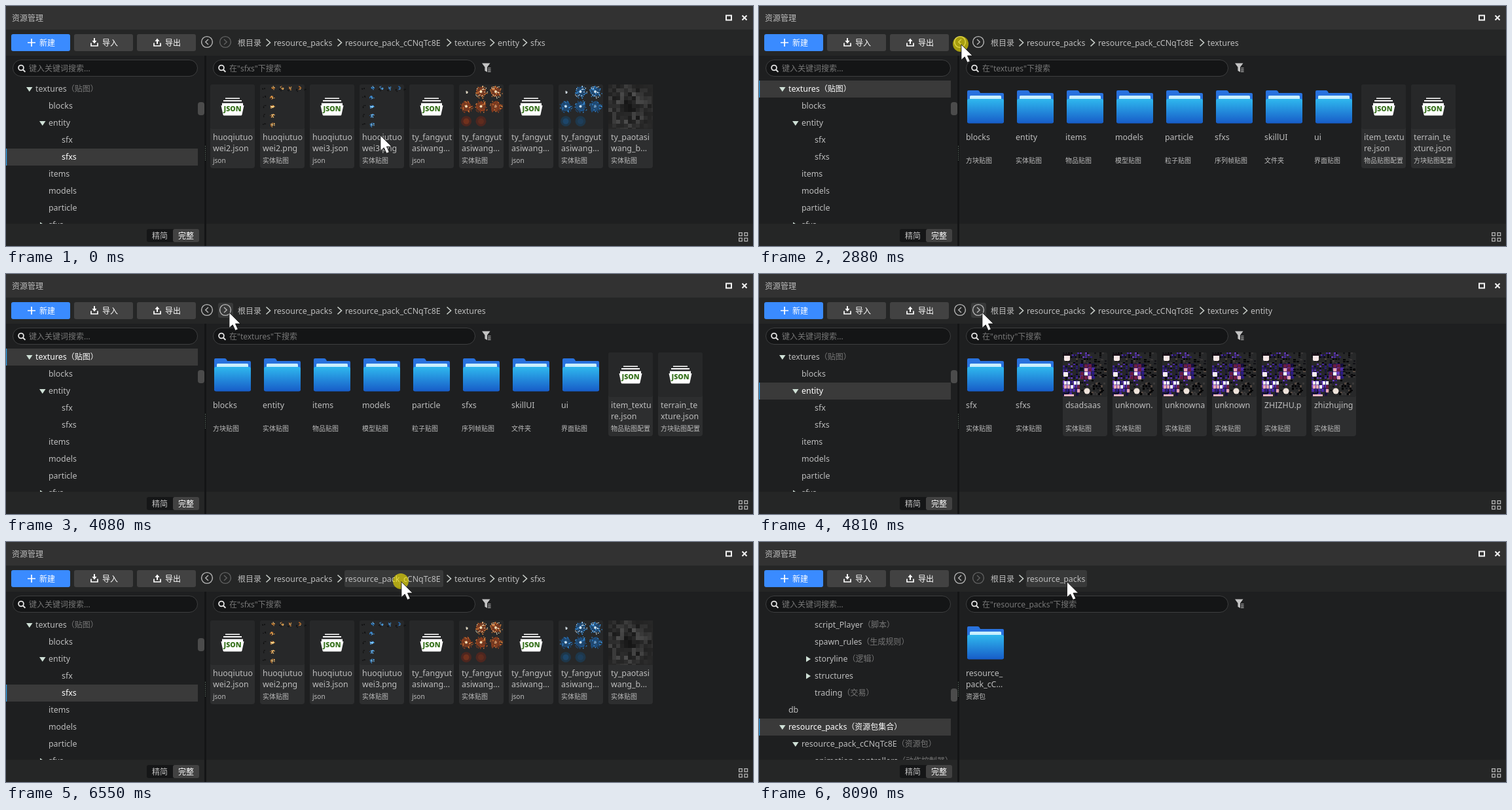
Write an HTML page that moves like this. It is 1141 px wide and 367 px high and loops after 8620 ms.

```html
<!DOCTYPE html>
<html lang="zh-CN">
<head>
<meta charset="utf-8">
<title>资源管理</title>
<style>
html, body { margin: 0; width: 100%; height: 100%; overflow: hidden; background: #1e1f20; }
svg { display: block; width: 1141px; height: 367px; }
text { font-family: "Noto Sans", "Noto Sans CJK SC", "Noto Sans CJK", sans-serif; font-size: 12.4px; fill: #bdbdbd; white-space: pre; }
.cn { font-size: 12px; }
.kind { font-size: 10px; }
.dim { fill: #777; }
.on { fill: #fff; }
.json { font-family: "Open Sans", "Noto Sans", sans-serif; font-size: 10.6px; font-weight: 800; fill: #3a7420; text-anchor: middle; }
</style>
</head>
<body>
<svg id="stage" viewBox="0 0 1141 367" xmlns="http://www.w3.org/2000/svg"></svg>
<script>
const LOOP = 8620, STEP = 70;
const stage = document.getElementById('stage');

// drawing helpers
const box = (x, y, w, h, fill, r = 0, more = '') =>
  `<rect x="${x}" y="${y}" width="${w}" height="${h}" rx="${r}" fill="${fill}" ${more}/>`;
const label = (x, y, s, cls = '') => `<text x="${x}" y="${y}" class="${cls}">${s}</text>`;
const line = (d, color, w = 1.5) => `<path d="${d}" fill="none" stroke="${color}" stroke-width="${w}"/>`;
const fill = (d, color) => `<path d="${d}" fill="${color}"/>`;
const disc = (x, y, r, color, o = 1) => `<circle cx="${x}" cy="${y}" r="${r}" fill="${color}" opacity="${o}"/>`;
const at = (x, y, s) => `<g transform="translate(${x} ${y})">${s}</g>`;

function seeded(seed) {
  return () => (seed = (seed * 16807) % 2147483647) / 2147483647;
}

// thumbnails, each 68 x 68
function specks(rnd, cx, cy, r, n, colors, size = 1.3) {
  let s = '';
  for (let i = 0; i < n; i++) {
    const a = rnd() * Math.PI * 2, d = r * Math.sqrt(rnd());
    s += box((cx + d * Math.cos(a)).toFixed(1), (cy + d * Math.sin(a)).toFixed(1), size, size,
      colors[Math.floor(rnd() * colors.length)]);
  }
  return s;
}

function trail(colors) {
  const rnd = seeded(77);
  let s = '';
  for (let i = 0; i < 4; i++) {
    s += specks(rnd, 19 + 13.5 * i, 5, 3.2 - i * 0.2, 10 - i, colors);
    s += specks(rnd, 30 + 13 * i, 8, 2, 3, ['#0b0b0c', '#141414']);
    s += specks(rnd, 18.5, 20 + 13.7 * i, 3.4, 15, colors);
    s += specks(rnd, 6, 19 + 13.7 * i, 2.4, 4, ['#0b0b0c', '#141414']);
  }
  return s + specks(rnd, 5, 6, 2, 4, ['#0b0b0c']) + box(17, 33, 4, 2, colors[1]);
}

function blast([hot, mid, low, faint]) {
  const rnd = seeded(431);
  let s = specks(rnd, 11, 11, 1.6, 7, ['#fff', hot]);
  for (let i = 1; i < 8; i++) {
    const x = 11 + 22.5 * (i % 3), y = 11 + 22.6 * Math.floor(i / 3), late = i > 5;
    s += disc(x, y, late ? 8 : 7.5, late ? faint : low, late ? 0.55 : 0.6);
    if (late) s += disc(x, y, 4.5, low, i === 6 ? 0.4 : 0.2);
    else s += specks(rnd, x, y, 10, 44, i < 3 ? [hot, mid, mid] : [mid, low, low]) + disc(x, y, 2, hot, i < 5 ? 0.9 : 0.4);
  }
  return s;
}

function smoke() {
  const rnd = seeded(90);
  let s = '';
  for (let y = 0; y < 68; y += 6)
    for (let x = 0; x < 68; x += 6) {
      const d = Math.hypot(x - 28, y - 32) / 36;
      const ringed = Math.max(0, 1 - Math.abs(d - 0.6) * 1.6);
      const v = Math.round(Math.max(16, 39 + (rnd() - 0.3) * 62 * ringed - (d < 0.3 ? 20 : 0)));
      s += box(x, y, Math.min(6, 68 - x), Math.min(6, 68 - y), `rgb(${v},${v},${v})`);
    }
  return s;
}

function skin() {
  const rnd = seeded(2024);
  const violet = ['#2b1a80', '#4a2aa8', '#16103c', '#0b0a18', '#6a3cc0'];
  const pale = ['#fff', '#f6e6ee', '#fff', '#e8a8b4', '#6a1c40'];
  const dark = ['#050507', '#111116', '#000', '#3a3838', '#544840'];
  // x, y, width, height, tile width, tile height, palette, density
  const zones = [
    [0, 0, 68, 68, 4, 3, dark, 0.35], [14, 0, 34, 11, 4, 3, violet, 0.5],
    [0, 17, 27, 26, 4, 3, violet, 0.75], [0, 43, 28, 24, 5, 6, violet, 0.9],
    [2, 44, 26, 23, 5, 6, pale, 0.5], [26, 17, 24, 26, 6, 6, violet, 1],
    [27, 18, 23, 25, 6, 6, pale, 0.85], [48, 10, 20, 28, 5, 3, dark, 0.5],
    [28, 42, 14, 10, 4, 3, violet, 0.7], [42, 46, 26, 20, 4, 4, dark, 0.5]
  ];
  let s = '';
  for (const [x0, y0, w, h, tw, th, colors, density] of zones)
    for (let y = y0; y <= y0 + h - th; y += th)
      for (let x = x0; x <= x0 + w - tw; x += tw)
        if (rnd() < density) s += box(x, y, tw - 1, th - 0.8, colors[Math.floor(rnd() * colors.length)]);
  return s + box(2, 3, 9, 10, '#f5e6e6', 2) + box(1, 2, 11, 3, '#1a1018') + box(1, 30, 7, 7, '#f7edf2', 1)
    + disc(37, 59, 4.5, '#f0e4dc') + box(2, 64, 15, 3, '#f3b8c4');
}

const folder = fill('M6 58V11q0-2 2-2H22q2 0 3 2l1 2H60q2 0 2 2V58z', '#2872de')
  + box(10, 17, 48, 8, '#c9efff', 1.5) + box(6, 22, 56, 37.5, 'url(#blue)', 3);
const json = box(23, 20.5, 22, 1.6, '#fff') + box(20, 24, 28, 2, '#fff')
  + fill('M18 28.5H50V32h1.5L48.5 46q-.3 1.5-1.7 1.5H21.2q-1.4 0-1.7-1.5L16.5 32H18z', '#fff')
  + `<text x="34" y="40.7" class="json">JSON</text>`;

const art = {
  d: folder, j: json, s: skin(), m: smoke(),
  o: trail(['#f0a040', '#ffd488', '#c86a20']), b: trail(['#3a9df0', '#7cc8ff', '#1f66b8']),
  e: blast(['#fff0c8', '#ee8a3c', '#a8441c', '#6e2418']),
  c: blast(['#dff2ff', '#3a9cf0', '#1c5c9c', '#174466']),
  r: box(0, 0, 68, 68, '#fff') + disc(35, 33, 26, '#2463bd')
};

// card text: art code, type, first line, second line
function card(spec, i) {
  const [code, kind = '', a = '', b = ''] = spec.split('|');
  const back = code === 'd' ? '' : box(0, 0, 68, 128, '#2d2e2f', 4) + box(0, 0, 68, 68, '#272829', 3);
  return at(312 + 76 * (i % 10), 120 + 132 * Math.floor(i / 10),
    back + `<use href="#art-${code}"/>` + label(4, 85, a) + label(4, 102, b) + label(4, 120, kind, 'kind'));
}

// tree rows: arrow, indent level, name, note
const trees = {
  upper: { thumb: 147, rows: ['v|1|textures|贴图', ' |2|blocks', 'v|2|entity', ' |3|sfx', ' |3|sfxs', ' |2|items', ' |2|models', ' |2|particle', '>|2|sfxs'] },
  lower: { thumb: 224, rows: [' |3|script_Player|脚本', ' |3|spawn_rules|生成规则', '>|3|storyline|逻辑', '>|3|structures', ' |3|trading|交易', ' |1|db',
    'v|1|resource_packs|资源包集合', 'v|2|resource_pack_cCNqTc8E|资源包', ' |3|animation_controllers|动作控制器'] }
};

function tree({ thumb, rows }, chosen) {
  return rows.map((row, i) => {
    const [arrow, level, name, note] = row.split('|');
    const x = 25 + 20 * level, y = 127 + 26 * i, on = i === chosen;
    return (on ? box(0, y - 13, 293, 26, '#3a3a3a') + box(0, y - 13, 1.2, 26, '#2da0ea') : '')
      + (arrow === 'v' ? fill(`M${x - 14} ${y - 3}h9.5l-4.75 7z`, '#cfe0d6') : '')
      + (arrow === '>' ? fill(`M${x - 13} ${y - 4.5}v9l7-4.5z`, '#cfe0d6') : '')
      + label(x, y + 4, name + (note ? `<tspan class="cn ${on ? 'on' : 'dim'}">（${note}）</tspan>` : ''), on ? 'on' : '');
  }).join('') + box(293, thumb, 10, 20, '#4b4b4b', 4);
}

const crumbs = ['根目录', 'resource_packs', 'resource_pack_cCNqTc8E', 'textures', 'entity', 'sfxs'];
const crumbX = [354, 409, 518, 685, 751, 801];
const chevron = (x, y, c = '#c9cfca') => line(`M${x - 3} ${y - 5.5}l6 5.5-6 5.5`, c, 1.6);
const skins = ['dsadsaas', 'unknown.', 'unknowna', 'unknown', 'ZHIZHU.p', 'zhizhujing'];

const views = {
  sfxs: { depth: 6, tree: 'upper', row: 4, cards: [
    'j|json|huoqiutuo|wei2.json', 'o|实体贴图|huoqiutuo|wei2.png', 'j|json|huoqiutuo|wei3.json', 'b|实体贴图|huoqiutuo|wei3.png',
    'j|json|ty_fangyut|asiwang...', 'e|实体贴图|ty_fangyut|asiwang...', 'j|json|ty_fangyut|asiwang...', 'c|实体贴图|ty_fangyut|asiwang...',
    'm|实体贴图|ty_paotasi|wang_b...'] },
  entity: { depth: 5, tree: 'upper', row: 2, cards: [
    'd|实体贴图|sfx', 'd|实体贴图|sfxs', ...skins.map(n => 's|实体贴图|' + n)] },
  textures: { depth: 4, tree: 'upper', row: 0, cards: [
    'd|方块贴图|blocks', 'd|实体贴图|entity', 'd|物品贴图|items', 'd|模型贴图|models', 'd|粒子贴图|particle', 'd|序列帧贴图|sfxs',
    'd|文件夹|skillUI', 'd|界面贴图|ui', 'j|物品贴图配置|item_textu|re.json', 'j|方块贴图配置|terrain_te|xture.json'] },
  pack: { depth: 3, tree: 'lower', row: 7, scroll: true, cards: [
    'd|原版模型动作|animation', 'd|原版动作...|animation', 'd|装备挂件配置|attachabl', 'd|文件夹|camera', 'd|中国版特...|effects',
    'd|实体资源...|entity', 'd|字体|font', 'd|材质|materials', 'd|文件夹|models', 'd|中国版物...|netease_it',
    ...'ddddddjrj'] },
  packs: { depth: 2, tree: 'lower', row: 6, cards: ['d|资源包|resource_|pack_cC...'] }
};

function view(name) {
  const v = views[name];
  let s = tree(trees[v.tree], v.row);
  for (let i = 0; i < v.depth; i++)
    s += label(crumbX[i], 61, crumbs[i], i ? '' : 'cn') + (i ? chevron(crumbX[i] - 8.5, 56) : '');
  s += label(341, 100, `在"${crumbs[v.depth - 1]}"下搜索`, 'cn dim');
  s += `<g clip-path="url(#list)">${v.cards.map(card).join('')}</g>`;
  if (v.scroll) s += box(1130, 120, 10, 164, '#4b4b4b', 4);
  return `<g id="view-${name}">${s}</g>`;
}

const search = (x, w) => box(x + 0.5, 82.5, w - 1, 25, '#141516', 12.5, 'stroke="#3e3f40"')
  + `<circle cx="${x + 13}" cy="94.5" r="3.9" fill="none" stroke="#e4e4e4" stroke-width="1.8"/>`
  + line(`M${x + 16} 97.5l3.4 3.4`, '#e4e4e4', 2);
const button = (x, color, text) => box(x, 43, 90, 26, color, 3) + label(x + 43, 61, text, 'cn on');
const tray = x => line(`M${x - 5} 56.5v4.5h10v-4.5`, '#fff', 1.7);
const ring = (x, dir) => `<circle cx="${x}" cy="55" r="8.4" fill="none" stroke="#b8b8b8" stroke-width="1.4"/>`
  + line(`M${x - 2 * dir} 51l${4.2 * dir} 4l${-4.2 * dir} 4`, '#b8b8b8', 1.4);

function chrome() {
  let s = box(0, 0, 1141, 36, '#323232') + box(0, 36, 1141, 40, '#252626');
  s += label(9, 22.5, '资源管理', 'cn') + line('M1100 14.5h8v7h-8z', '#f4f4f4', 2) + line('M1124.5 14.5l7 7m0-7l-7 7', '#f4f4f4', 2);
  s += button(8, '#3a8bff', '新建') + line('M33 56h12M39 50v12', '#fff', 1.7);
  s += button(104, '#424242', '导入') + tray(135) + line('M135 49v5', '#fff', 2) + fill('M131.5 53h7l-3.5 4.5z', '#fff');
  s += button(200, '#424242', '导出') + tray(231) + line('M231 53v5', '#fff', 2) + fill('M227.5 54h7l-3.5-4.5z', '#fff');
  s += search(10, 283) + label(35, 100, '键入关键词搜索...', 'cn dim') + search(316, 401);
  s += fill('M727 87.5h12.5l-4.5 6v7.5l-3.6-2v-5.5z', '#c4c4c4') + line('M736 95h4.5M736 97.8h4.5M736 100.5h4.5', '#c4c4c4', 1.2);
  return s;
}

function footer() {
  let s = box(0, 333, 1141, 34, '#252626') + box(303, 76, 3, 291, '#141516');
  s += `<path d="M304.5 214v24" stroke="#7d9585" stroke-dasharray="1 2"/>`;
  s += box(215, 341, 44, 20, '#151617', 3) + box(255, 341, 40, 20, '#424242', 3);
  s += label(223, 356, '精简', 'cn') + label(263, 356, '完整', 'cn on');
  for (const x of [1119.7, 1128])
    for (const y of [346.7, 355]) s += box(x, y, 4.6, 4.6, 'none', 0, 'stroke="#b4b4b4" stroke-width="1.3"');
  return s;
}

stage.innerHTML = `<defs>
  <linearGradient id="blue" x2="0" y2="1"><stop stop-color="#2fb8ee"/><stop offset="1" stop-color="#175cc8"/></linearGradient>
  <clipPath id="list"><rect x="306" y="110" width="824" height="216"/></clipPath>
  ${Object.entries(art).map(([k, s]) => `<g id="art-${k}">${s}</g>`).join('')}</defs>`
  + box(0, 0, 1141, 367, '#1e1f20') + chrome()
  + box(0, 43, 0, 26, '#383939', 3, 'id="hover"')
  + ring(307, -1) + `<g id="next">${ring(335, 1)}</g>`
  + Object.keys(views).map(view).join('') + footer()
  + `<g id="pointer"><circle id="click" r="12" fill="#ffee00" opacity=".6"/>
     <path d="M.9 .8V24.6l5.3-4.8 4 8.6 4.2-1.9-3.9-8.4h7.7z" fill="#fff" stroke="#101010" stroke-width=".9"/></g>`;

// timeline
const pages = [[0, 'sfxs'], [1360, 'entity'], [2290, 'textures'], [3010, 'packs'], [4080, 'textures'],
  [4740, 'entity'], [5480, 'sfxs'], [6950, 'pack'], [8090, 'packs']];
const clicks = [[1030, 130], [2020, 130], [2880, 130], [3820, 130], [4540, 130], [5210, 130], [6550, 140], [7830, 130]];
const hovers = [[0, 0, 0], [3820, 324, 23], [5480, 0, 0], [6550, 517, 151], [7830, 408, 93]];
const home = [571, 197];
// start, steps, destination, upward bow
const moves = [[200, 10, 308, 58, 0], [3270, 6, 340, 58, 0], [6010, 5, 603, 60, 3], [7420, 4, 469.5, 60, 0]];

const latest = (list, t) => list.filter(e => e[0] <= t).pop();

function pointerAt(t) {
  let [x, y] = home;
  for (const [start, steps, toX, toY, bow] of moves) {
    if (t < start) break;
    const p = Math.min(1, (Math.floor((t - start) / STEP) + 1) / steps);
    const k = (1 - Math.cos(Math.PI * p)) / 2;
    x += (toX - x) * k;
    y += (toY - y) * k - bow * Math.sin(Math.PI * p);
  }
  return [x, y];
}

const byId = id => document.getElementById(id);
const hover = byId('hover'), next = byId('next'), click = byId('click'), pointer = byId('pointer');

function draw(t) {
  const page = latest(pages, t)[1];
  for (const name in views) byId('view-' + name).style.display = name === page ? '' : 'none';
  next.setAttribute('opacity', t >= 1360 && t < 5480 ? 1 : 0.4);
  const [, x, w] = latest(hovers, t);
  hover.setAttribute('x', x);
  hover.setAttribute('width', w);
  hover.setAttribute('y', w === 23 ? 44 : 43);
  hover.setAttribute('height', w === 23 ? 23 : 26);
  click.style.display = clicks.some(([start, hold]) => t >= start && t < start + hold) ? '' : 'none';
  pointer.setAttribute('transform', `translate(${pointerAt(t).map(v => v.toFixed(2)).join(' ')})`);
}

function tick() {
  draw(performance.now() % LOOP);
  requestAnimationFrame(tick);
}
tick();
</script>
</body>
</html>
```
